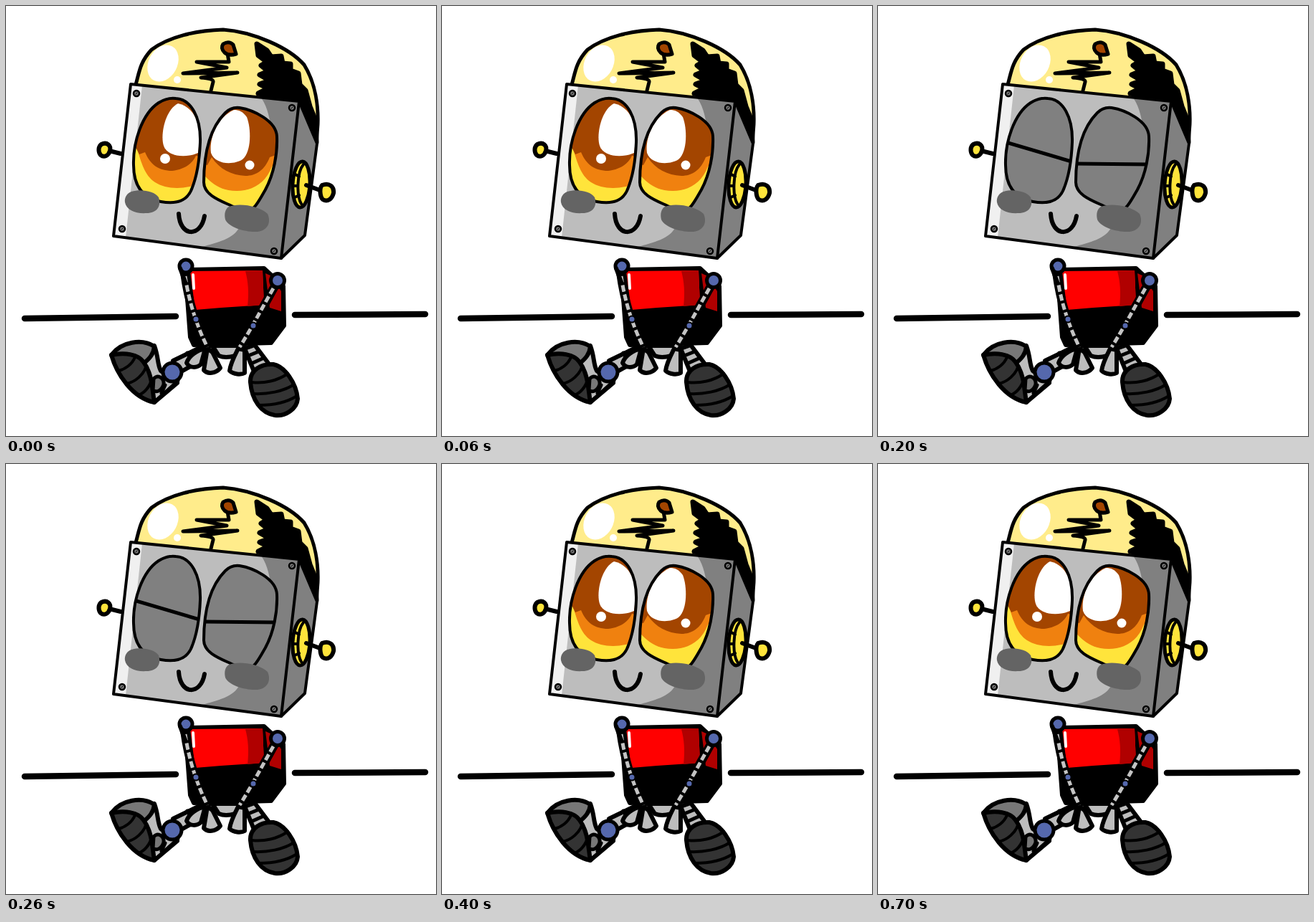
These frames come from a looping animation (600x600 px, 900 ms). An HTML page:

```html
<!DOCTYPE html>
<html lang="en">
<head>
<meta charset="utf-8">
<title>Blinking robot</title>
<style>
html, body { margin: 0; width: 100%; height: 100%; overflow: hidden; background: #fff; }
svg { display: block; width: 100vw; height: 100vh; }
.ink { stroke: #000; stroke-linecap: round; stroke-linejoin: round; }
.line { fill: none; }
</style>
</head>
<body>
<svg viewBox="0 0 600 600" xmlns="http://www.w3.org/2000/svg">
  <defs>
    <path id="eyeL" d="M237 129C258 130 272 155 271 190C270 215 266 240 258 258C250 275 232 276 216 273C190 268 178 250 178 222C177 190 190 150 213 135C221 130 230 128 237 129Z"/>
    <path id="eyeR" d="M326 142C345 145 377 160 378 182C379 205 374 235 361 258C352 274 345 287 335 286C328 285 322 282 315 279C300 272 276 264 276 246C276 205 285 170 306 149C312 143 318 141 326 142Z"/>
    <clipPath id="clipL"><use href="#eyeL"/></clipPath>
    <clipPath id="clipR"><use href="#eyeR"/></clipPath>
  </defs>

  <!-- horizon -->
  <g class="ink line" stroke-width="8.5">
    <path d="M26 436L237 433M403 431L585 430"/>
  </g>

  <!-- dome -->
  <path d="M181 110C186 92 187 78 203 61C227 43 265 34 303 33C345 36 395 58 416 82C432 108 436 140 435 165L433 192L409 133Z" fill="#ffec8b"/>
  <path d="M350 53L364 62L370 71L384 70L386 80L397 81L397 90L408 94L410 110L418 118L424 140L432 160L433 190L409 132L352 122L366 115L354 109L368 104L354 96L366 91L356 83L364 78L352 69Z" class="ink" stroke-width="7"/>
  <path class="ink line" stroke-width="5" d="M181 110C186 92 187 78 203 61C227 43 265 34 303 33C345 36 395 58 416 82C432 108 436 140 435 165L433 192"/>
  <ellipse cx="219" cy="80" rx="20" ry="27" fill="#fff" transform="rotate(28 219 80)"/>
  <circle cx="239" cy="103" r="5" fill="#fff"/>
  <path class="ink line" stroke-width="5" d="M309 66L311 78L266 78L308 86L247 94L323 93L272 100Q290 101 289 106L286 118"/>
  <path class="ink" stroke-width="5" fill="#a34500" d="M303 53Q311 48 317 54L321 67Q311 70 305 65Q299 59 303 53Z"/>

  <!-- left antenna -->
  <path class="ink line" stroke-width="6" d="M144 202L160 206"/>
  <path class="ink" stroke-width="6" fill="#ffe43b" d="M133 193C141 189 147 195 145 202C143 209 137 212 132 208C128 203 129 196 133 193Z"/>

  <!-- head -->
  <path fill="#808080" d="M409 133L434 192L417 320L384 352Z"/>
  <path fill="#bdbdbd" d="M174 109L409 133L384 352L150 321Z"/>
  <path fill="#f0f0f0" d="M174 109L190 111L167 323L150 321Z"/>
  <path fill="#808080" d="M356 128C366 142 368 160 372 180L340 280L326 308C318 325 295 330 273 336L384 352L409 133Z"/>
  <g class="ink line" stroke-width="4">
    <path d="M174 109L409 133L384 352L150 321Z"/>
    <path d="M409 133L434 192L417 320L384 352"/>
  </g>
  <g id="screws" class="ink" fill="#777" stroke-width="2.5"></g>

  <!-- right antenna -->
  <g class="ink" stroke-width="5">
    <ellipse cx="412" cy="249" rx="12" ry="32" fill="#ffe43b" transform="rotate(3 412 249)"/>
    <path class="line" stroke-width="4" d="M415 221C406 232 405 264 412 276M402 234L409 238M401 251L407 251M403 267L409 264"/>
    <path class="line" stroke-width="6" d="M419 250L438 257"/>
    <path fill="#ffe43b" stroke-width="6" d="M441 250C451 246 458 252 457 261C455 269 449 274 442 270C438 266 437 254 441 250Z"/>
  </g>

  <!-- eyes -->
  <g clip-path="url(#clipL)">
    <path fill="#ffe43b" d="M170 120H280V285H170Z"/>
    <path fill="#f0810f" d="M170 120H280V243C255 257 225 257 208 246C193 236 189 218 183 200L170 190Z"/>
    <path fill="#a34500" d="M170 120H280V212L265 209C259 222 247 228 232 230C213 230 201 221 194 204L186 207L181 197Z"/>
    <path fill="#fff" d="M240 136C222 145 215 180 220 195C225 210 250 213 268 205L271 180C268 155 258 140 240 136Z"/>
    <circle cx="222" cy="213" r="7" fill="#fff"/>
    <g id="lidL"></g>
  </g>
  <g clip-path="url(#clipR)">
    <path fill="#ffe43b" d="M270 135H385V290H270Z"/>
    <path fill="#f0810f" d="M270 135H385V212L371 224C362 248 343 258 322 258C300 258 287 249 270 229Z"/>
    <path fill="#a34500" d="M270 135H385V205L368 211C361 229 349 237 334 237C315 236 298 228 287 211L281 222L270 220Z"/>
    <path fill="#fff" d="M318 145C295 155 283 185 286 205C292 222 318 222 330 214C343 203 342 170 336 155C330 147 325 145 318 145Z"/>
    <circle cx="340" cy="222" r="6.5" fill="#fff"/>
    <g id="lidR"></g>
  </g>
  <g class="ink line" stroke-width="4">
    <use href="#eyeL"/><use href="#eyeR"/>
  </g>
  <g fill="#646464">
    <path d="M175 259C188 255 207 258 213 267C217 279 211 289 196 289C181 290 168 285 166 274C165 267 169 261 175 259Z"/>
    <path d="M311 280C325 274 354 279 365 290C370 301 366 313 351 315C334 316 311 309 306 298C304 290 306 283 311 280Z"/>
  </g>
  <path class="ink line" stroke-width="6" d="M241 290C243 323 272 323 277 293"/>

  <!-- legs -->
  <g class="ink" stroke-width="6">
    <path fill="#bdbdbd" d="M272 476L291 474L287 486L243 511L233 495Z"/>
    <path class="line" stroke-width="5" d="M253 484L261 500"/>
    <path fill="#bdbdbd" d="M288 474L331 474L320 488Q306 492 297 488Z"/>
    <path fill="#bdbdbd" d="M333 478L347 473L368 501L346 510Z"/>
    <path class="line" stroke-width="5" d="M338 488L353 482M342 499L360 491"/>
  </g>

  <!-- left boot -->
  <g class="ink" stroke-width="6">
    <path fill="#bdbdbd" d="M207 474C213 490 211 500 216 509L239 526L207 553L192 497Z"/>
    <path fill="#777" d="M147 487C161 468 190 464 207 475C206 486 200 492 193 498C180 485 165 484 147 487Z"/>
    <path fill="#333" d="M147 487C166 483 185 486 192 497C204 513 204 535 207 553C177 547 155 515 147 487Z"/>
    <path class="line" stroke-width="4" d="M157 509C166 507 176 500 180 490M169 527C181 524 192 514 195 504M185 543C193 540 201 531 203 521"/>
    <path fill="#777" stroke-width="5" d="M206 520C213 513 221 520 220 528C217 537 210 540 205 536Z"/>
    <path class="line" stroke-width="5" d="M207 553L240 523M217 540L222 529"/>
    <circle cx="232" cy="511" r="13" fill="#5568ad" stroke-width="5"/>
  </g>

  <!-- right boot -->
  <g class="ink" stroke-width="6">
    <path fill="#333" d="M341 525C340 508 356 499 373 500C389 503 405 526 407 548C406 562 390 573 375 571C356 568 343 550 341 525Z"/>
    <path class="line" stroke-width="4" d="M343 525C360 527 379 523 393 513M345 541C364 542 387 538 402 528M353 557C372 557 392 553 406 544"/>
  </g>

  <!-- body -->
  <path class="ink" stroke-width="6" d="M250 368L360 366L387 391L388 446L370 470L262 473L257 462Z"/>
  <path fill="#f00" d="M257 370L358 369L360 417L300 421L264 424Z"/>
  <path fill="#b00000" d="M334 370L358 369L360 417L337 419C339 400 338 385 334 370Z"/>
  <path fill="#b00000" d="M362 373L371 377L384 398V426L368 421Z"/>
  <path fill="none" stroke="#fff" stroke-width="4" stroke-linecap="round" d="M261 375L262 394"/>

  <!-- hands and arms -->
  <g class="ink" fill="#bdbdbd" stroke-width="6">
    <path d="M278 478C267 480 255 488 252 498C256 506 267 505 272 500Z"/>
    <path d="M281 478L276 508C281 514 293 513 299 505L288 483Z"/>
    <path d="M324 478C319 488 313 499 312 509C317 514 328 515 333 512L333 480Z"/>
  </g>
  <g fill="none">
    <g stroke="#000" stroke-width="12">
      <path d="M249 372C253 402 262 440 281 478"/>
      <path d="M375 391C359 420 343 449 326 478"/>
    </g>
    <g stroke="#c4c4c4" stroke-width="5" stroke-dasharray="9 4">
      <path d="M250 377C254 405 263 440 281 476"/>
      <path d="M373 394C358 420 343 449 326 476"/>
    </g>
  </g>
  <g class="ink" fill="#5568ad">
    <circle cx="251" cy="363" r="9" stroke-width="5"/>
    <circle cx="379" cy="383" r="9.5" stroke-width="5"/>
    <circle cx="265" cy="437" r="4.5" stroke-width="2"/>
    <circle cx="345" cy="446" r="4.5" stroke-width="2"/>
  </g>
  <path class="ink line" stroke-width="6" d="M243 366L250 385"/>
</svg>
<script>
const el = id => document.getElementById(id);

el("screws").innerHTML = [[182, 122], [399, 142], [162, 311], [374, 342]].map(([x, y]) =>
  `<circle cx="${x}" cy="${y}" r="4"/><path stroke-width="1" d="M${x - 1} ${y + 1}l2 -2"/>`).join("");

// Lid edges per pose: heights at the left and right end of each edge.
const eyes = [
  { id: "lidL", x: [170, 280], half: [[173.6, 197], [218, 241]], shut: [[187.5, 220]] },
  { id: "lidR", x: [270, 385], half: [[199, 204], [240.5, 245]], shut: [[220, 221]] }
];
const poses = ["open", "half", "shut", "half", "open"];
const step = 100, loop = 900;

function drawLids({ id, x: [a, b], ...edges }, pose) {
  const rows = edges[pose];
  if (!rows) {
    el(id).innerHTML = "";
    return;
  }
  const top = rows[0], low = rows[rows.length - 1];
  const lid = (y, [l, r]) => `<path fill="#808080" d="M${a} ${y}L${a} ${l}L${b} ${r}L${b} ${y}Z"/>`;
  const edge = ([l, r]) => `<path class="ink" stroke-width="5" d="M${a} ${l}L${b} ${r}"/>`;
  el(id).innerHTML = lid(100, top) + lid(300, low) + rows.map(edge).join("");
}

let shown;
function render(t) {
  const pose = poses[Math.min(poses.length - 1, Math.floor(t % loop / step))];
  if (pose === shown) return;
  shown = pose;
  eyes.forEach(eye => drawLids(eye, pose));
}

const start = performance.now();
function tick() {
  render(performance.now() - start);
  requestAnimationFrame(tick);
}
tick();
</script>
</body>
</html>
```
